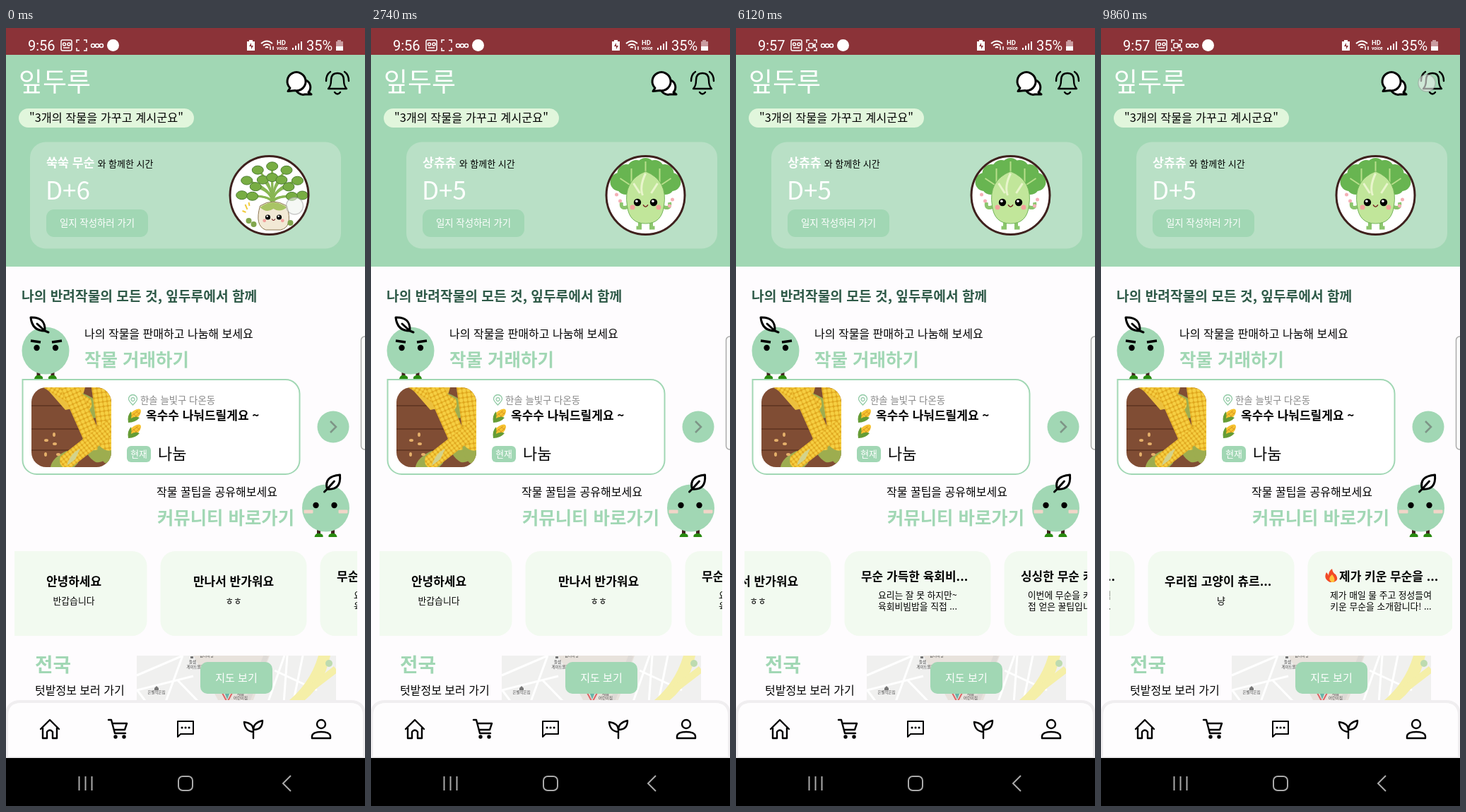
An HTML page for the animation above (9920 ms loop, 508 by 1102 pixels).

```html
<!DOCTYPE html>
<html lang="ko">
<head>
<meta charset="utf-8">
<style>
  html, body { margin: 0; width: 100%; height: 100%; overflow: hidden; background: #fefcfe; }
  svg { display: block; width: 508px; height: 1102px; }
  text { font-family: "Noto Sans CJK KR", sans-serif; font-size: 16px; white-space: pre; }
  .m { font-weight: 500; }
  .b { font-weight: 700; }
  .g { fill: #a1d7b4; }
  .w { fill: #fff; }
  .c { text-anchor: middle; }
  .map { font-size: 5.4px; fill: #444; text-anchor: middle; }
  .status { font-family: Roboto, sans-serif; font-size: 20px; }
  .line { fill: none; stroke: #000; stroke-width: 2.4; stroke-linecap: round; stroke-linejoin: round; }
</style>
</head>
<body>
<svg viewBox="0 0 508 1102">
  <defs>
    <clipPath id="heroClip"><rect x="18" y="155" width="472" height="165"/></clipPath>
    <clipPath id="postClip"><rect x="12" y="735" width="485" height="130"/></clipPath>
    <clipPath id="photoClip"><rect x="36" y="509" width="113" height="113" rx="21"/></clipPath>
    <clipPath id="mapClip"><rect x="185" y="889" width="282" height="68"/></clipPath>
    <pattern id="kernels" width="5.5" height="6" patternUnits="userSpaceOnUse">
      <rect width="6" height="6" fill="#dfa51c"/>
      <rect x=".4" y=".4" width="4.7" height="5.2" rx="1.8" fill="#f6cf42"/>
    </pattern>
    <g id="cob">
      <path d="M-13 36Q-19 60-9 72Q0 78 10 71Q18 58 13 34Z" fill="#9dad4f"/>
      <path d="M-12 50V-42Q-10-58 0-60Q10-58 12-42V50Q0 65-12 50Z" fill="url(#kernels)"/>
    </g>
    <g id="cornIcon">
      <path d="M1 13Q4 4 13 1Q19-1 19 4Q18 12 8 17Z" fill="#f7c331"/>
      <path d="M5 11L15 3M9 14L18 5M8 7l5 5M12 4l5 4" stroke="#db9a20" fill="none"/>
      <path d="M1 20Q-1 10 5 4Q6 10 5 14Q11 10 17 13Q11 20 1 20" fill="#659c35"/>
    </g>
    <path id="pin" d="M8 13Q2 7 2 4.500A6 6 0 0 1 14 4.500Q14 7 8 13ZM8 2.500a2.500 2.500 0 1 0 .1 0" fill="none" stroke="#8fc9a4" stroke-width="1.300"/>
    <g id="face">
      <circle cx="-10" r="4.500"/><circle cx="10" r="4.500"/>
      <circle class="w" cx="-11" cy="-1.500" r="1.600"/><circle class="w" cx="9" cy="-1.500" r="1.600"/>
      <path d="M-3 3Q0 8 3 3" fill="none" stroke="#722" stroke-width="1.300"/>
      <g fill="#f3a19c"><circle cx="-16" cy="6" r="3"/><circle cx="16" cy="6" r="3"/></g>
    </g>
    <g id="feet">
      <path d="M-10 31v10M10 31v10" stroke="#40231f" stroke-width="5"/>
      <path d="M-16 41q1-6 8-5q5 1 4 5ZM16 41q-1-6-8-5q-5 1-4 5Z" fill="#298a10"/>
    </g>
  </defs>

  <rect width="508" height="1102" fill="#fefcfe"/>
  <rect width="508" height="338" class="g"/>
  <rect width="508" height="38" fill="#8b3338"/>

  <!-- status bar -->
  <text id="clock" class="w status" x="31" y="31.500"></text>
  <g fill="none" stroke="#fff" stroke-width="1.500">
    <rect x="78" y="17" width="15" height="15" rx="2"/>
    <circle cx="82.500" cy="23" r="2"/><circle cx="89" cy="23" r="2"/><path d="M81 28h9"/>
    <path d="M104 17h-4v4M110 17h4v4M104 32h-4v-4M110 32h4v-4"/>
    <g id="recording"><rect x="103" y="22" width="6" height="6" rx="1"/><path d="M109 25l3-2v4z"/></g>
    <circle cx="123" cy="25" r="2.500"/><circle cx="129" cy="25" r="2.500"/><circle cx="135" cy="25" r="2.500"/>
    <path d="M361 22q8-7 16 0M364 25q5-4 10 0M367 28q2-2 4 0" stroke-width="2"/>
    <path d="M374 31v-5M378 26v5" />
    <path d="M406 31v-3M410 31v-6M414 31v-9M418 31V19" stroke-width="2"/>
  </g>
  <circle class="w" cx="151.500" cy="24.500" r="8.500"/>
  <path class="w" d="M344 17h5v2h3v13h-11V19h3Z"/>
  <path d="M347 21l-3 5h3v4l3-5h-3Z" fill="#8b3338"/>
  <text class="w b" x="383" y="24" style="font:700 9.500px Roboto,sans-serif">HD</text>
  <text class="w b" x="383" y="31" style="font:700 6.500px Roboto,sans-serif">voice</text>
  <text class="w status" x="425" y="31.500">35%</text>
  <path d="M469 17h5v2h3v13h-10V19h2Z" fill="#c99ca0"/>
  <path class="w" d="M467 26h10v6h-10Z"/>

  <!-- header -->
  <text class="w m" x="18" y="90" style="font-size:37px">잎두루</text>
  <g fill="#fff" stroke="#000" stroke-width="3" stroke-linejoin="round">
    <path d="M428 91a10.500 10.500 0 1 0-5 3l9 0Z"/>
    <path d="M402 85a13 13 0 1 1 7 3.500l-10 1Z"/>
  </g>
  <g class="line" stroke-width="3">
    <path d="M456 86Q460 82 460 74Q460 64 469 64Q478 64 478 74Q478 82 482 86ZM465 91q4 5 8 0M453 75q0-9 6-13M485 75q0-9-6-13"/>
  </g>
  <rect x="18" y="114" width="248" height="27" rx="13.500" fill="#e1f6dc"/>
  <text class="m c" x="142" y="133" style="font-size:16.300px">"3개의 작물을 가꾸고 계시군요"</text>
  <g clip-path="url(#heroClip)"><g id="hero"></g></g>

  <!-- market -->
  <text class="b" x="22" y="387" fill="#2f5a48" style="font-size:19.200px">나의 반려작물의 모든 것, 잎두루에서 함께</text>
  <g transform="translate(56 457)">
    <use href="#feet" y="-1"/>
    <circle class="g" r="33.500"/>
    <path class="line w" style="fill:#fff;stroke-width:3" d="M-1-28Q-19-28-21-47Q0-48-1-28L-12-38M-1-28L4-26"/>
    <circle cx="-12.500" cy="-4" r="4.200"/><circle cx="14" cy="-4" r="4.200"/>
    <path d="M-21-14l14 2M9-12l14-2" stroke="#000" stroke-width="3.500"/>
  </g>
  <text class="m" x="111" y="439">나의 작물을 판매하고 나눔해 보세요</text>
  <text class="b g" x="111" y="479" style="font-size:25.500px">작물 거래하기</text>
  <path d="M23.500 498H395a20 20 0 0 1 20.500 20V612a20 20 0 0 1-20 20H43.500a20 20 0 0 1-20-20Z" fill="#fff" stroke="#a1d7b4" stroke-width="2"/>

  <g id="corn">
    <g clip-path="url(#photoClip)">
      <rect x="36" y="509" width="113" height="113" fill="#804d34"/>
      <path d="M36 535h113M36 568h113M36 598h113" stroke="#653925" stroke-width="2"/>
      <path d="M56 509h56l-8 28-20 4Z" fill="#ecc03d"/>
      <path d="M145 615Q104 592 92 509h12Q119 580 149 604Z" fill="#b5bd68"/>
      <use href="#cob" transform="translate(76 511) rotate(-58) scale(.9)"/>
      <use href="#cob" transform="translate(105 542) rotate(-24) scale(1.050)"/>
      <use href="#cob" transform="translate(138 536) rotate(-8) scale(1.100)"/>
      <use href="#cob" transform="translate(119 588) rotate(52) scale(.9)"/>
      <path d="M86 620Q91 602 105 596L98 611Z" fill="#d3d28b"/>
      <g fill="#e5b06a"><ellipse cx="57" cy="584" rx="3" ry="2"/><ellipse cx="68" cy="576" rx="2" ry="3"/><ellipse cx="69" cy="589" rx="3" ry="2"/><ellipse cx="56" cy="604" rx="2" ry="3"/><ellipse cx="74" cy="604" rx="3" ry="2"/></g>
    </g>
    <use href="#pin" x="171.500" y="521"/>
    <text x="190" y="532" fill="#888" style="font-size:13.400px">한솔 늘빛구 다온동</text>
    <use href="#cornIcon" x="172" y="539"/><use href="#cornIcon" x="172" y="561"/>
    <text class="b" x="198" y="555" style="font-size:17px">옥수수 나눠드릴게요 ~</text>
    <rect class="g" x="171" y="592" width="34" height="23" rx="6"/>
    <text class="w m c" x="188" y="608" style="font-size:12.800px">현재</text>
    <text class="m" x="215" y="611" style="font-size:22px">나눔</text>
  </g>
  <g id="lettuce">
    <rect x="36" y="509" width="113" height="113" rx="21" fill="#f7f7f6"/>
    <path d="M43 527Q39 516 51 519Q61 510 70 517Q82 510 91 516Q103 511 109 520Q122 516 122 526Q137 523 140 535Q149 543 141 552Q147 561 137 565Q134 574 124 575Q119 590 109 594Q102 612 86 612Q78 620 68 613Q54 615 53 602Q40 596 46 582Q38 572 44 561Q37 547 43 527Z" fill="#8fc43e"/>
    <path d="M49 526Q80 515 104 532Q134 532 132 551Q102 569 79 603Q55 603 57 574Q42 558 49 526Z" fill="#b6db62"/>
    <path d="M70 606Q67 572 51 533M70 590Q84 560 129 539M67 568Q72 536 92 523M71 597Q95 579 122 567" fill="none" stroke="#dcecac" stroke-width="3"/>
    <path d="M53 544q7 3 3 13M82 531q-5 9 4 15M112 542q-4 9 8 11M86 585q11-1 13 8M60 583q5 5-1 12" fill="none" stroke="#699f29" stroke-width="2.500"/>
    <use href="#pin" x="171.500" y="532"/>
    <text x="190" y="543" fill="#888" style="font-size:13.400px">한솔 늘빛구 다온동</text>
    <text class="b" x="171" y="565" style="font-size:17px">상추 판매합니다</text>
    <rect class="g" x="171" y="581" width="34" height="23" rx="6"/>
    <text class="w m c" x="188" y="597" style="font-size:12.800px">현재</text>
    <text x="215" y="600" style="font:22px 'DejaVu Sans','Noto Sans CJK KR',sans-serif">1112<tspan class="m">원</tspan></text>
  </g>
  <circle class="g" cx="463" cy="565" r="22.500"/>
  <path d="M459 557l8 8-8 8" fill="none" stroke="#7e9587" stroke-width="2.500"/>
  <rect x="502.500" y="437" width="14" height="160" rx="5" fill="#fafafa" stroke="#aaa" stroke-width="1.500"/>

  <!-- community -->
  <text class="m" x="213" y="663">작물 꿀팁을 공유해보세요</text>
  <text class="b g" x="214" y="703" style="font-size:25.400px">커뮤니티 바로가기</text>
  <g transform="translate(452.500 680)">
    <use href="#feet"/>
    <circle class="g" r="33.500"/>
    <path class="line" style="fill:#fff;stroke-width:3" d="M2-27Q-3-45 20-47Q22-25 2-27L12-38M2-27L-2-23"/>
    <circle cx="-14" cy="-4" r="4.200"/><circle cx="12" cy="-4" r="4.200"/>
    <rect x="-31" y="2.500" width="13" height="5" rx="1" fill="#f2d5c8"/><rect x="18" y="2.500" width="13" height="5" rx="1" fill="#f2d5c8"/>
  </g>
  <g clip-path="url(#postClip)"><g id="posts"></g></g>

  <!-- map -->
  <text class="b g" x="41" y="912" style="font-size:27.700px">전국</text>
  <text class="m" x="41" y="944">텃밭정보 보러 가기</text>
  <g clip-path="url(#mapClip)">
    <rect x="185" y="889" width="282" height="68" fill="#f0f0ef"/>
    <path d="M185 917l65-28M185 938l80-20M225 957l25-68M200 957l-15-20M243 924l32 33M370 957l24-68M380 910l60 28M398 889l-5 68M420 889l-14 68" stroke="#fff" stroke-width="3"/>
    <path d="M265 889h108l-25 68h-45Z" fill="#e8e2dc"/>
    <path d="M368 889l-28 68" stroke="#dedad6" stroke-width="7"/>
    <path d="M395 957Q430 930 442 889H459Q449 935 416 957Z" fill="#f5efa8"/>
    <path d="M403 957L467 908" stroke="#f5efa8" stroke-width="10"/>
    <circle cx="457" cy="900" r="5" fill="#bddbb0"/>
    <path d="M305 940l8 15 8-15" fill="none" stroke="#d66" stroke-width="2"/>
    <path d="M309 941l4 10 4-10" fill="#67b4a8"/>
    <path d="M261 893v-3h4v3ZM210 935l3-3 3 3v3h-6Z" fill="#777"/>
    <text class="map" x="264" y="900">들샘</text><text class="map" x="268" y="907">게이트볼장</text>
    <text class="map" x="213" y="943">은별작은집</text><text class="map" x="284" y="891">쉼터마당</text>
    <text class="map" x="332" y="945" fill="#397">새봄</text><text class="map" x="332" y="951">어린이집</text>
  </g>
  <rect class="g" x="275" y="898" width="102" height="45" rx="10"/>
  <text class="w c" x="326" y="926" style="font-size:15px">지도 보기</text>

  <!-- tab bar -->
  <path d="M1 1034V974Q1 954 21 954H487Q507 954 507 974V1034Z" fill="#fefdfe" stroke="#f0eef0" stroke-width="4"/>
  <g class="line">
    <path d="M49 993L62 980L75 993M52 991V1006H58V997Q62 992 66 997V1006H72V991"/>
    <path d="M145 980H149L154 999H169M151 985H171L168 994H153"/>
    <circle cx="155" cy="1004" r="1.500"/><circle cx="167" cy="1004" r="1.500"/>
    <path d="M243 1004V982H265V1000H247Z" stroke-width="2"/>
    <path d="M249 991h.1M254 991h.1M259 991h.1" style="stroke-width:3"/>
    <path d="M350 1006V994Q350 984 363 981Q363 994 350 994Q350 985 337 983Q338 996 350 997"/>
    <circle cx="446" cy="986" r="6"/><path d="M433 1006V1003Q434 997 446 997Q458 997 459 1003V1006Z"/>
  </g>
  <rect y="1034" width="508" height="68"/>
  <g fill="none" stroke="#aaa" stroke-width="2">
    <path d="M103.500 1060v20M112.500 1060v20M121.500 1060v20M403 1059l-11 11 11 11"/>
    <rect x="244" y="1060" width="20" height="20" rx="6"/>
  </g>
  <circle id="touch" r="12" fill="#eef3ee" fill-opacity=".6" stroke="#999" stroke-opacity=".5" stroke-width="1.500"/>
</svg>
<script>
const LOOP = 9920;
const $ = id => document.getElementById(id);
const dots = (points, r, fill) => points.map(([x, y]) =>
  `<circle cx="${x}" cy="${y}" r="${r}" fill="${fill}"/>`).join('');

const sprouts = Array.from({ length: 14 }, (_, i) => {
  const a = Math.PI * (1.03 + (i % 7) * .157), r = i < 7 ? 43 : 28;
  return [4 + r * Math.cos(a), 4 + r * 1.05 * Math.sin(a)];
});

const radish = sprouts.map(([x, y]) =>
  `<path d="M5 12Q4 ${y / 2} ${x} ${y}" fill="none" stroke="#88b653" stroke-width="3"/>
   <ellipse cx="${x}" cy="${y}" rx="8" ry="6" fill="#78ad43" stroke="#4c7c31"/>`).join('') + `
  <path d="M-13 15Q5 3 25 15Q34 45 16 49H-5Q-21 43-13 15" fill="#f2e9d5" stroke="#8b7650"/>
  <path d="M-13 17Q5 3 25 17Q15 25 6 19Q-4 26-13 17" fill="#a9c465"/>
  <use href="#face" transform="translate(6 31) scale(.8)"/>
  ${dots([[-29, 36], [-22, 41], [30, 39]], 4, '#81a64d')}
  <path d="M-34 13l3 7M-29 10l1 5M-38 22l5 2" stroke="#f0cc3e" stroke-width="2"/>`;

const tomato = `
  <circle cx="26" cy="3" r="20" fill="#e75738" stroke="#702a20"/>
  <path d="M-17 34v6h7M5 34v6h7" fill="none" stroke="#a4341e" stroke-width="5"/>
  <ellipse cx="-7" cy="13" rx="28" ry="25" fill="#ed6042" stroke="#702a20"/>
  <path d="M-33-16Q-10-36 9-16L35-24M-15-20L-9-6M9-16L25-8" fill="none" stroke="#587630" stroke-width="3"/>
  <path d="M-28-5L-20-16L-8-11L4-17L8-5L-4-8L-8 0L-14-7Z" fill="#75933c"/>
  ${dots([[-32, -17], [-21, -29], [-4, -31], [11, -25], [31, -24]], 5, '#7c9d43')}
  <use href="#face" transform="translate(-7 18)"/>
  <path d="M-38-4l3 6 6 2-6 3-3 6-2-6-6-3 6-2Z" fill="#f4dc78"/>`;

const lettuce = `
  <path d="M-22 15Q-36 22-34 10M22 15Q36 22 34 10M-8 35v11h-5M8 35v11h5" fill="none" stroke="#8bc56d" stroke-width="5"/>
  ${dots([[-37, -19], [37, -19], [-27, -31], [27, -31], [-28, -14], [28, -14], [0, -40], [-13, -37], [13, -37]], 13, '#68b551')}
  <path d="M0 0L-36-24M0 0L36-24M0 0V-48M-20-13L-20-38M20-13L20-38" stroke="#b8df8b" stroke-width="2"/>
  <path d="M0-34Q-32-21-26 15Q-23 40 0 40Q23 40 26 15Q32-21 0-34" fill="#c1e69a" stroke="#71b458"/>
  <path d="M0-31Q-9-12-4 0M-17-17L-8-3M17-17L8-3" stroke="#e9f5cc" stroke-width="3" fill="none"/>
  <use href="#face" transform="translate(0 10) scale(1.150)"/>
  ${dots([[-36, 8], [-41, -1], [38, 6], [34, 15]], 2.5, '#f4b0b6')}`;

const crops = [['쑥쑥 무순', 6, radish], ['멋쟁이토마토', 4, tomato], ['상츄츄', 5, lettuce]];
$('hero').innerHTML = crops.map(([name, day, art], i) => `
  <g transform="translate(${34 + i * 478} 0)">
    <rect x="0" y="161.500" width="440" height="151" rx="22" fill="#b9e0c6"/>
    <text class="w b" x="23" y="197" style="font-size:17.300px">${name}<tspan dx="4" class="m" style="fill:#000;font-size:13px">와 함께한 시간</tspan></text>
    <text class="w" x="22" y="243" style="font-size:35px">D+${day}</text>
    <rect class="g" x="23" y="257" width="144" height="39" rx="11"/>
    <text class="w c" x="95" y="281" style="font-size:13.400px">일지 작성하러 가기</text>
    <g transform="translate(338.500 237)"><circle r="55.500" fill="#fff"/>${art}<circle r="55.500" fill="none" stroke="#3f211e" stroke-width="3"/></g>
  </g>`).join('');

const flame = `<path d="M-72 785Q-82 780-77 771Q-74 774-74 776Q-74 769-69 766Q-68 772-64 774Q-58 783-68 785Z" fill="#f24a27"/>
  <path d="M-70 785Q-76 780-69 774Q-63 781-67 785Z" fill="#ffc43d"/>`;
const posts = [
  ['안녕하세요', '반갑습니다'],
  ['만나서 반가워요', 'ㅎㅎ'],
  ['무순 가득한 육회비...', '요리는 잘 못 하지만~', '육회비빔밥을 직접 ...'],
  ['싱싱한 무순 키우는 ...', '이번에 무순을 키우면서 직', '접 얻은 꿀팁입니다! 무순..'],
  ['우리집 고양이 츄르...', '냥'],
  ['제가 키운 무순을 ...', '제가 매일 물 주고 정성들여', '키운 무순을 소개합니다! ...'],
];
$('posts').innerHTML = posts.map(([title, ...body], i) => {
  const top = body.length > 1 ? 783 : 790, last = i === 5;
  const cut = title.endsWith('...');
  return `<g transform="translate(${96 + i * 226} 0)">
    <rect x="-103.500" y="741" width="207" height="120" rx="21" fill="#f2faf0"/>
    ${last ? flame : ''}
    <text class="b ${cut ? '' : 'c'}" x="${last ? -59 : cut ? -80 : 0}" y="${top}" style="font-size:17px">${title}</text>
    ${body.map((s, n) => `<text class="c" y="${top + 26 - (body.length - 1) + n * 16}" style="font-size:12.800px">${s}</text>`).join('')}
  </g>`;
}).join('');

// Keys are [time, position]; a third value marks a decelerating fling.
const heroKeys = [[0, 0], [60, 0], [780, 372], [1450, 640, 1], [1810, 802], [2050, 940, 1]];
const postKeys = [[5500, 0], [5950, 240], [6450, 330, 1], [6840, 565], [7400, 830, 1]];
// Touches: start, end, from x/y, to x/y.
const touches = [
  [0, 800, 409, 252, 14, 299], [1450, 1840, 430, 250, 253, 251],
  [5500, 5950, 400, 832, 160, 840], [6450, 6880, 386, 830, 127, 843],
  [9800, LOOP, 461, 78, 461, 78],
];

function scrollAt(keys, t) {
  const n = keys.findIndex(k => k[0] > t);
  if (n === 0) return keys[0][1];
  if (n < 0) return keys[keys.length - 1][1];
  const [t0, v0] = keys[n - 1], [t1, v1, fling] = keys[n];
  const p = (t - t0) / (t1 - t0);
  return v0 + (v1 - v0) * (fling ? 1 - (1 - p) ** 2 : p);
}

function draw() {
  const t = performance.now() % LOOP;
  $('hero').setAttribute('transform', `translate(${-scrollAt(heroKeys, t)} 0)`);
  $('posts').setAttribute('transform', `translate(${-scrollAt(postKeys, t)} 0)`);

  const selling = t >= 3400 && t < 4700;
  $('lettuce').style.display = selling ? '' : 'none';
  $('corn').style.display = selling ? 'none' : '';
  const later = t >= 4600;
  $('clock').textContent = later ? '9:57' : '9:56';
  $('recording').style.display = later ? '' : 'none';

  const touch = touches.find(([a, b]) => t >= a && t < b);
  $('touch').style.display = touch ? '' : 'none';
  if (touch) {
    const [a, b, x0, y0, x1, y1] = touch, p = (t - a) / (b - a);
    $('touch').setAttribute('cx', x0 + (x1 - x0) * p);
    $('touch').setAttribute('cy', y0 + (y1 - y0) * p);
  }
  requestAnimationFrame(draw);
}
draw();
</script>
</body>
</html>
```
